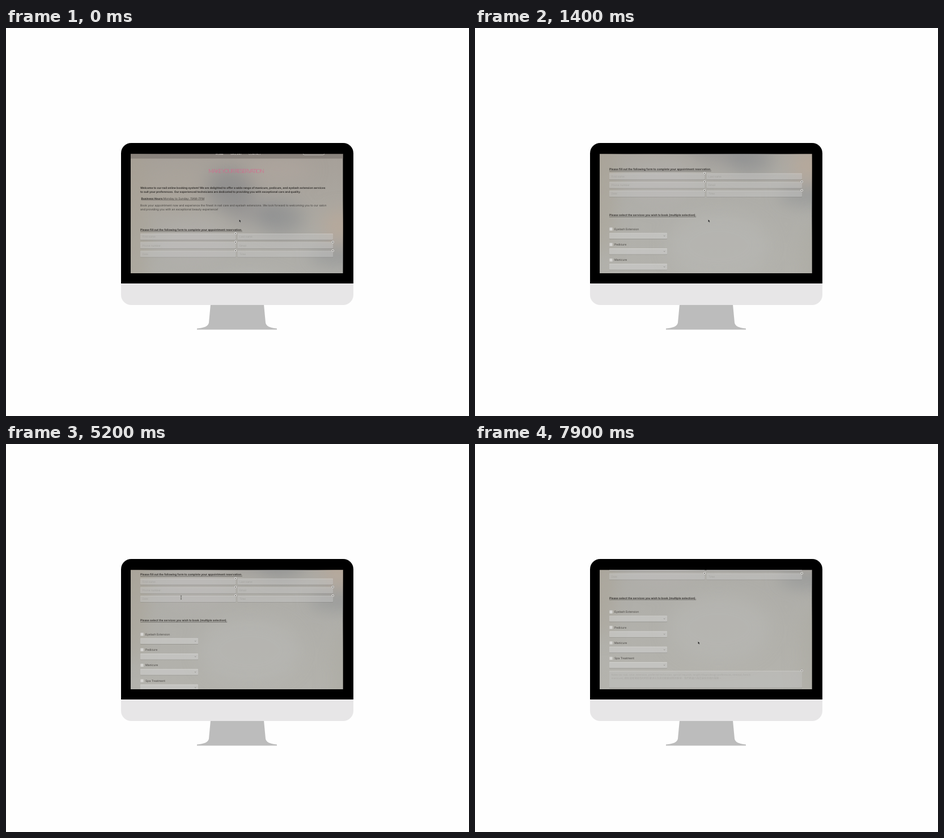
An HTML page that plays this animation: 817 by 685 pixels, repeating every 8 s.

```html
<!DOCTYPE html>
<html lang="en">
<head>
<meta charset="utf-8">
<title>Reservation form</title>
<style>
  html, body { margin: 0; width: 100%; height: 100%; overflow: hidden; background: #fefefe; }
  svg { display: block; }
  text { font: 5.05px Inter, sans-serif; fill: #45423f; text-rendering: geometricPrecision; white-space: pre; }
  .bold { font-size: 4.9px; font-weight: 700; fill: #35322f; }
  .line { text-decoration: underline; }
  .hint { font-size: 4.7px; fill: #a3a29e; }
  .note { font: 4.4px "Noto Sans CJK TC", "Noto Sans CJK", sans-serif; fill: #a9a8a4; }
  .title { font: 300 10px Lato, sans-serif; letter-spacing: -1.3px; fill: #df5f8b; }
  .nav { font-size: 4.6px; fill: #dedad5; }
</style>
</head>
<body>
<svg width="817" height="685" viewBox="0 0 817 685">
  <defs>
    <linearGradient id="wall" x1="0" y1="0" x2="0" y2="1">
      <stop offset="0" stop-color="#a59e97"/>
      <stop offset=".25" stop-color="#aaa69f"/>
      <stop offset=".5" stop-color="#afaea9"/>
      <stop offset="1" stop-color="#b5b4ae"/>
    </linearGradient>
    <filter id="soft" x="-50%" y="-50%" width="200%" height="200%">
      <feGaussianBlur stdDeviation="15"/>
    </filter>
  </defs>
  <path d="M361 488H455L458 520Q459 529 478 530.5V532.5H337V530.5Q357 529 358 520Z" fill="#bcbcbc"/>
  <path d="M203 451H613V471A18 18 0 0 1 595 489H221A18 18 0 0 1 203 471Z" fill="#e7e6e7"/>
  <path d="M203 451V221A18 18 0 0 1 221 203H595A18 18 0 0 1 613 221V451Z"/>
  <svg x="220" y="222.5" width="374.5" height="210.5" viewBox="220 222.5 374.5 210.5">
    <g id="page">
      <rect x="200" y="200" width="420" height="420" fill="url(#wall)"/>
      <g id="blobs" filter="url(#soft)"></g>
    </g>
    <path id="arrow" d="M0 0V4.6L1.1 3.7L1.9 5.4L2.7 5L1.9 3.4L3.2 3.3Z" fill="#111" stroke="#ddd" stroke-width=".25"/>
    <path id="beam" d="M-1 -3H1M0 -3V3M-1 3H1" fill="none" stroke="#55534f" stroke-width=".8"/>
  </svg>
</svg>
<script>
const NS = 'http://www.w3.org/2000/svg';
const $ = id => document.getElementById(id);
const page = $('page'), arrow = $('arrow'), beam = $('beam');

function add(tag, attrs, parent = page) {
  const el = document.createElementNS(NS, tag);
  for (const k in attrs) el.setAttribute(k, attrs[k]);
  return parent.appendChild(el);
}
// y is the vertical middle of the line
function text(str, x, y, cls = '') {
  const el = add('text', { x, y: y + 1.75, class: cls });
  el.textContent = str;
  return el;
}
function box(x, y, w, h, alpha) {
  add('rect', { x, y: y + .9, width: w, height: h, rx: 1, fill: '#000', opacity: .13 });
  add('rect', { x, y, width: w, height: h, rx: 1, fill: '#fff', opacity: alpha });
}
function badge(x, y) {
  add('circle', { cx: x, cy: y, r: 2.4, fill: '#e6e5e2', stroke: '#8d8b88', 'stroke-width': .4 });
  add('circle', { cx: x, cy: y, r: .9, fill: '#44423f' });
}

// x, y, rx, ry, colour, opacity
[
  [225, 330, 25, 180, '#a79f92', .5],
  [395, 285, 42, 36, '#7f8084', .55],
  [440, 325, 50, 22, '#85868a', .4],
  [485, 335, 40, 30, '#84878b', .5],
  [590, 402, 55, 16, '#85898d', .55],
  [590, 350, 32, 30, '#bda996', .6],
  [480, 250, 60, 18, '#b3a79f', .5],
  [300, 285, 50, 40, '#aba399', .5],
  [330, 380, 60, 40, '#b3b2ad', .5],
  [430, 490, 90, 60, '#b8b8b5', .6],
  [600, 540, 26, 90, '#aca99f', .5]
].forEach(([cx, cy, rx, ry, fill, opacity]) =>
  add('ellipse', { cx, cy, rx, ry, fill, opacity }, $('blobs')));

add('rect', { x: 220, y: 200, width: 375, height: 30.5, fill: '#77716c', opacity: .6 });
text('HOME', 370, 222.5, 'nav');
text('GALLERY', 396, 222.5, 'nav');
text('CONTACT', 428, 222.5, 'nav');
add('rect', { x: 524, y: 214, width: 38, height: 10, rx: 3, fill: 'none', stroke: '#d5d1cc', 'stroke-width': .7 });

text('MAKE YOUR RESERVATION', 357, 254.5, 'title');
text('Welcome to our nail online booking system! We are delighted to offer a wide range of manicure, pedicure, and eyelash extension services', 237, 282, 'bold');
text('to suit your preferences. Our experienced technicians are dedicated to providing you with exceptional care and quality.', 237, 289.6, 'bold');
const hours = text('', 238.5, 300.9, 'line');
add('tspan', { class: 'bold' }, hours).textContent = 'Business Hours:';
add('tspan', {}, hours).textContent = 'Monday to Sunday: 11AM-7PM';
text('Book your appointment now and experience the finest in nail care and eyelash extensions. We look forward to welcoming you to our salon', 237, 313, '');
text('and providing you with an exceptional beauty experience!', 237, 320.6);

text('Please fill out the following form to complete your appointment reservation.', 237, 356, 'bold line');
const rowY = i => 363 + i * 15.2;
[['First name', 'Last name'], ['Phone number', 'Email'], ['Date', 'Time']].forEach((row, i) =>
  row.forEach((label, j) => {
    const x = j ? 408.5 : 237;
    box(x, rowY(i), 168.5, 11, .33);
    text(label, x + 3.5, rowY(i) + 5.7, 'hint');
  }));
for (let i = 0; i < 3; i++) {
  badge(405, rowY(i) - .2);
  if (i) badge(576.7, rowY(i) - .2);
}

text('Please select the services you wish to book.(multiple selection).', 237, 437, 'bold line');
['Eyelash Extension', 'Pedicure', 'Manicure', 'Spa Treatment'].forEach((label, i) => {
  const y = 461.5 + i * 27.3;
  add('rect', { x: 237.3, y: y - 2.7, width: 5.4, height: 5.4, rx: .6, fill: '#d6d5d2', stroke: '#bdbcb8', 'stroke-width': .4 });
  text(label, 246, y);
  box(237, y + 6.7, 102, 10.4, .4);
  add('path', { d: `M332.9 ${y + 11.4}l1.3 1.2l1.3 -1.2`, fill: 'none', stroke: '#777571', 'stroke-width': .6 });
});

box(237, 565.5, 340, 30, .3);
text('Notes (ex: nail, color, extension, preferred technician, special requests, length/shape/design preferences, removal, french', 240.5, 572.6, 'note');
text('manicure), 請在這裡填寫您的特別要求以及其他需要說明的事項，我們將盡力為您安排合適的服務。', 240.5, 578.4, 'note');
badge(576.7, 565.3);

// time, value(s)
const scroll = [
  [0, 0], [100, 4], [300, 26], [600, 45], [700, 46], [900, 46], [1000, 51], [1200, 86],
  [1400, 106.5], [1500, 107.5], [1900, 107.5], [2500, 113], [2700, 113], [3300, 119],
  [3500, 125.5], [6700, 125.5], [7000, 130], [7200, 130], [7600, 156], [7900, 165]
];
const pointer = [
  [0, 411.5, 338], [3900, 411.5, 338], [4200, 480, 262], [4500, 330, 272], [4800, 262, 405],
  [4900, 262, 402], [5200, 309, 271], [5300, 322, 270], [5500, 322, 270], [5900, 396, 292],
  [6200, 403.5, 302], [6400, 403.5, 302], [6500, 403.5, 277], [6600, 393.5, 348.5]
];
function at(keys, t) {
  const i = keys.findIndex(k => k[0] > t);
  if (i < 0) return keys[keys.length - 1].slice(1);
  const a = keys[i - 1], b = keys[i], f = (t - a[0]) / (b[0] - a[0]);
  return a.slice(1).map((v, n) => v + (b[n + 1] - v) * f);
}

const LOOP = 8000, TICK = 100;
const start = performance.now();
function draw(now) {
  const t = Math.floor(Math.max(0, now - start) % LOOP / TICK) * TICK;
  const [s] = at(scroll, t), [x, y] = at(pointer, t);
  const inField = t >= 4000 && [0, 1, 2].some(i => y + s > rowY(i) && y + s < rowY(i) + 11);
  page.setAttribute('transform', `translate(0 ${-s})`);
  for (const el of [arrow, beam]) el.setAttribute('transform', `translate(${x} ${y})`);
  arrow.style.display = inField ? 'none' : '';
  beam.style.display = inField ? '' : 'none';
  requestAnimationFrame(draw);
}
draw(start);
</script>
</body>
</html>
```
